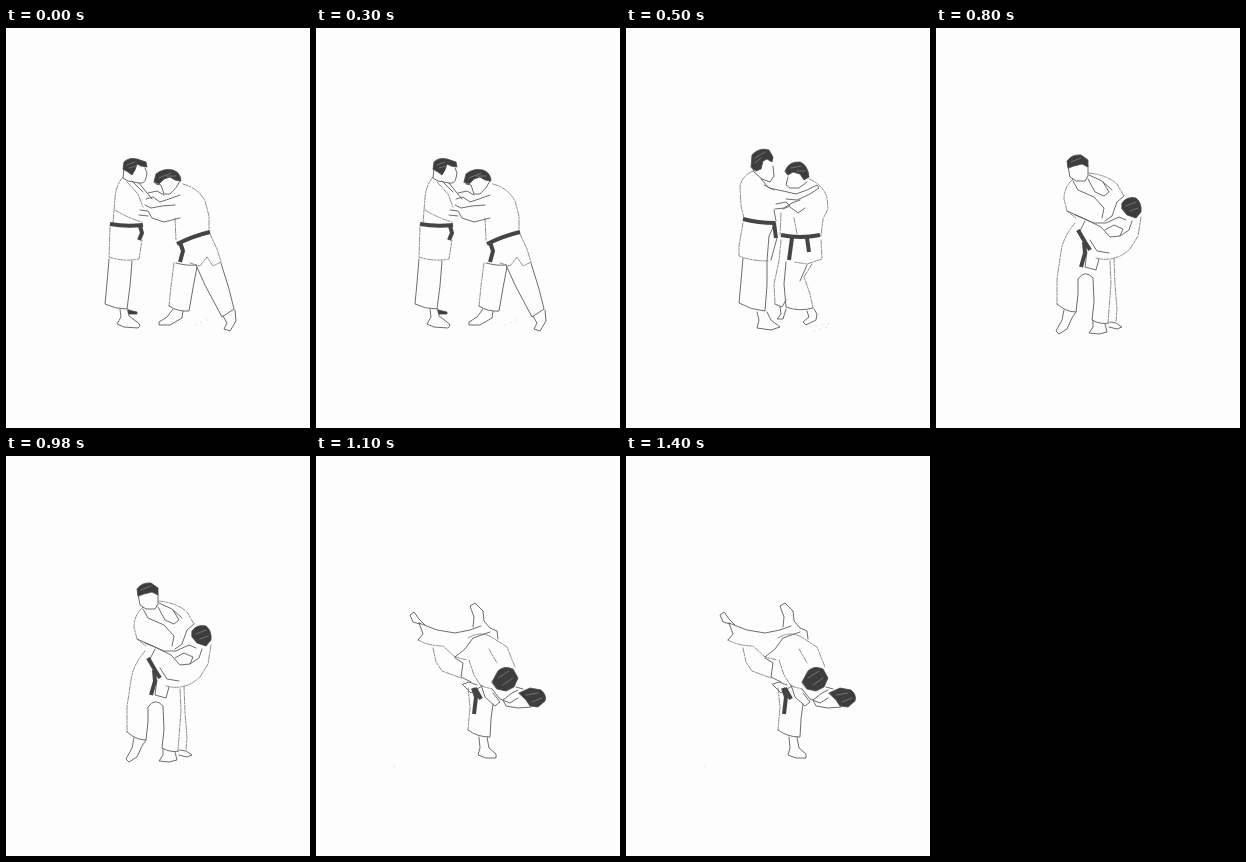
An HTML page that plays this animation: 304 by 400 pixels, repeating every 1.6 s.

```html
<!DOCTYPE html>
<html lang="en">
<head>
<meta charset="utf-8">
<title>Judo throw</title>
<style>
  html, body { margin: 0; width: 100%; height: 100%; overflow: hidden; background: #fdfdfd; }
  svg { display: block; width: 100%; height: 100%; }
  path { fill: none; stroke-linecap: round; stroke-linejoin: round; }
  .line { stroke: #666; stroke-width: .95; }
  .soft { stroke: #858585; stroke-width: .9; stroke-dasharray: 5 1.2 2 1.5; }
  .hair { fill: #3d3d3d; stroke: #484848; stroke-width: .8; }
  .belt { stroke: #444; stroke-width: 4; stroke-linecap: butt; }
  .glint { stroke: #8a8a8a; stroke-width: .7; }
  .speck { stroke: #ddd; stroke-width: 1; stroke-dasharray: 1 5; }
</style>
</head>
<body>
<svg id="stage" viewBox="0 0 304 400"></svg>
<script>
const LOOP = 1600;

// Each pose: start time, then path data grouped by pen.
const poses = [
  { at: 0,
    soft: [
      'M117 149Q110 157 109 170L107 195', 'M104 199L103 229Q118 234 133 231L136 212',
      'M177 156Q192 160 199 173L203 188V204', 'M169 190L170 212',
      'M121 154L132 166L137 179', 'M109 182Q122 190 136 194',
      'M168 235L165 258L163 278', 'M204 206L211 221L215 234L207 238L201 229L194 238L184 235'
    ],
    line: [
      'M118 140L117 150L122 153L133 155Q139 156 140 150L141 145L139 140',
      'M133 155L141 165L146 171', 'M126 153L137 164',
      'M150 156L155 157L158 166L164 166Q171 160 174 153', 'M142 165L151 163L158 167',
      'M140 171L147 169L154 174L163 171L174 167', 'M139 177L145 180L156 178L169 177',
      'M134 182L142 183L146 190L158 194L174 190', 'M133 187L142 188',
      'M103 231L101 255L99 276Q109 281 121 281L124 258L126 233',
      'M114 281L115 289L111 296L118 299L132 300Q136 297 131 294L123 288L122 281',
      'M163 278Q172 284 183 283L187 260L191 239',
      'M170 235Q181 238 190 237L199 257L216 289L228 281L223 261L215 235',
      'M167 281L161 289L153 294V297L164 297L176 290L177 283',
      'M217 288L221 295L218 301L224 303L230 293L229 282'
    ],
    belt: ['M104 196Q120 199 137 197', 'M134 198L136 205L133 212', 'M204 204Q187 208 171 216', 'M174 214L177 223L174 234'],
    hair: [
      'M117 141L118 134Q123 129 131 131L140 134L141 139L135 138L131 136L129 142L126 147L122 144Z',
      'M148 154L150 146Q157 140 167 142Q175 145 175 153L169 152L164 149L158 151L153 156Z',
      'M122 282L131 284V286L123 286Z'
    ],
    glint: ['M121 137L129 134M123 140L130 138', 'M153 150L165 145M160 148L170 148'],
    speck: ['M189 297L205 290']
  },
  { at: 500,
    soft: [
      'M127 143Q116 148 114 158L115 178L118 190', 'M117 195L113 218V228Q125 233 142 233',
      'M183 151Q196 156 201 169L202 181L197 191L195 208', 'M195 212L196 231L181 236L168 234',
      'M155 185L154 207', 'M155 212L153 233L148 256L149 276',
      'M186 236L178 249L184 266L187 280', 'M168 190L171 206'
    ],
    line: [
      'M126 138L128 144L136 151L144 154L148 148L147 138',
      'M135 151L143 160L157 163L170 166L181 162L191 157L193 160L184 166L171 172L160 171',
      'M138 157L148 162', 'M149 181L158 180L166 175L174 172', 'M150 176L160 174L164 178L157 181',
      'M162 149L160 157L164 160L173 160L181 154', 'M164 179L172 185L179 180',
      'M148 182L150 193L143 208L141 233', 'M151 210L145 232',
      'M117 230L115 253L113 275Q125 282 139 283L141 257V234',
      'M131 284L133 292L131 300L145 302L154 299L145 292L141 284',
      'M160 234L158 256L160 279Q173 284 187 280',
      'M149 276L156 279L160 272', 'M154 279L155 286L151 291H157L160 281',
      'M181 283L183 289L177 294L180 297L190 292L191 286L188 281',
      'M181 237L174 253'
    ],
    belt: ['M117 191Q132 195 149 195', 'M148 195L150 210', 'M155 207Q174 211 194 207', 'M166 210L163 232', 'M181 210L183 224'],
    hair: [
      'M125 139L126 127Q133 119 143 122L147 129L146 134L141 131L137 133L135 141L130 143Z',
      'M159 143Q163 133 174 134Q182 137 183 149L178 152L174 146L167 144L162 147Z'
    ],
    glint: ['M129 130L139 124M129 135L135 130', 'M165 140L175 138M171 143L179 143'],
    speck: ['M184 299L207 295', 'M188 303L202 299']
  },
  { at: 800,
    soft: [
      'M137 151Q128 159 128 171L131 183L140 190', 'M139 195Q127 209 125 224L121 251V276',
      'M153 145Q171 147 181 156L188 168', 'M205 189L202 208L194 221Q179 235 160 230',
      'M174 233L175 255L172 295', 'M178 230L179 257L181 281L180 294'
    ],
    line: [
      'M132 138L134 149L140 153H149L152 148V138',
      'M137 153L142 162L158 169L168 180L166 190', 'M152 151L159 164L168 168L173 164L167 154',
      'M153 147L166 153L176 162', 'M188 168L181 174L176 188L169 193',
      'M131 183L147 190L165 199L174 209L184 208L187 201L178 197L169 202',
      'M139 187L158 195L170 195L183 189L190 192', 'M184 208L193 202L196 193',
      'M149 193L144 203', 'M154 212L161 223L173 225', 'M151 224L149 239L160 242L163 231',
      'M121 276Q130 284 140 284L142 266V251Q149 241 157 250L158 274L156 292Q165 297 173 295',
      'M128 282L126 292L120 303L123 306L131 301L136 290L140 284',
      'M157 293L157 299L153 305L163 306L171 304L169 296',
      'M174 294L180 295L186 299L181 301L173 299'
    ],
    belt: ['M142 202L149 214L154 222', 'M148 214L149 225L145 239'],
    hair: [
      'M132 140L131 133Q136 126 145 127L152 132L152 139L146 136L138 138Z',
      'M186 175Q191 168 200 170Q206 175 205 184L200 190L191 187L186 181Z'
    ],
    glint: ['M135 134L145 130', 'M190 178L200 174M194 183L202 180'],
    speck: []
  },
  { at: 1100,
    soft: [
      'M102 184Q113 190 127 190L139 201L151 204', 'M117 192L120 206L126 215L145 222',
      'M152 182Q165 174 177 182L191 191L199 211', 'M153 204L158 219L165 230L176 233',
      'M152 232L154 251L152 274', 'M173 193L181 207'
    ],
    line: [
      'M103 167L121 174L139 177L154 174L165 170', 'M103 167L107 178L102 184',
      'M104 168L97 166L94 159L98 156L103 163L109 169',
      'M157 171L158 161L154 150L159 147L167 155L168 165L174 172L181 175L182 183',
      'M139 201L149 193L157 182L174 176', 'M139 202L147 207L145 221L155 226',
      'M146 228L155 237L166 230', 'M147 228L153 226L161 229',
      'M165 229L169 241L179 250L184 246L177 237', 'M176 233L184 243L194 247L202 242',
      'M202 234L196 237L187 244L190 250L202 252L215 251', 'M200 231L207 233',
      'M152 274Q161 281 174 281L175 263L177 248',
      'M163 281L164 292L162 299L170 302L180 302L180 298L173 292L171 281'
    ],
    belt: ['M157 232L160 241L158 258', 'M159 232L165 243'],
    hair: [
      'M176 226L182 215Q188 209 197 213L202 222L198 231L190 235L181 233Z',
      'M203 237L214 232L225 234Q231 239 229 245L222 251L214 250L210 244Z'
    ],
    glint: ['M182 222L193 215M187 229L197 222', 'M210 239L222 237M216 246L226 242'],
    speck: ['M78 310L79 313']
  }
];

const stage = document.getElementById('stage');
const NS = stage.namespaceURI;
const pens = ['speck', 'soft', 'line', 'belt', 'hair', 'glint'];

function build(pose) {
  const group = document.createElementNS(NS, 'g');
  for (const pen of pens) {
    for (const d of pose[pen]) {
      const path = document.createElementNS(NS, 'path');
      path.setAttribute('class', pen);
      path.setAttribute('d', d);
      group.append(path);
    }
  }
  stage.append(group);
  return group;
}

const groups = poses.map(build);
const start = performance.now();

function draw(now) {
  const t = Math.max(0, now - start) % LOOP;
  const current = poses.filter(p => p.at <= t).length - 1;
  groups.forEach((g, i) => g.setAttribute('display', i === current ? 'inline' : 'none'));
  requestAnimationFrame(draw);
}
draw(start);
</script>
</body>
</html>
```
